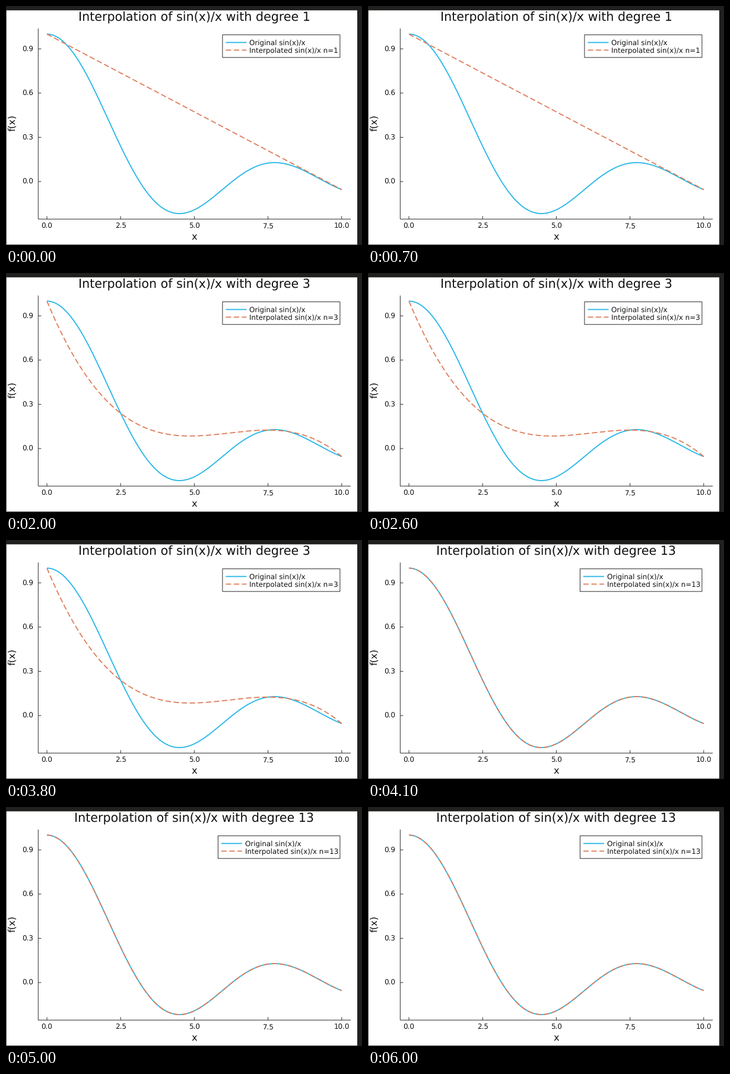
Recreate the animation shown at these times as a matplotlib script. Size 600 by 403 pixels, loop 6100 ms.

```python
import numpy as np
import matplotlib.pyplot as plt
from matplotlib.animation import FuncAnimation
from matplotlib.patches import Rectangle

W, H, DPI = 600, 403, 64
PT = 72 / DPI  # points per pixel
FRAMES, STEP = 61, 100
STAGE_FRAMES = 20
DEGREES = (1, 3, 13)

BLUE, ORANGE, INK, DARK = "#24b6e8", "#de7c59", "#2c2c2c", "#20201e"
TITLE, GUIDE, SMALL = 20.6, 16.2, 11.85
LEFT, RIGHT, TOP, BOTTOM = 54.3, 581, 38, 359.3
CURVE = 1.8

plt.rcParams.update({"font.family": "DejaVu Sans", "text.hinting": "none",
                     "text.hinting_factor": 8, "toolbar": "None"})

fig = plt.figure(figsize=(W / DPI, H / DPI), dpi=DPI, facecolor=DARK)
ax = fig.add_axes([0, 0, 1, 1])
ax.set(xlim=(0, W), ylim=(H, 0))
ax.axis("off")


def px(x):
    return 69 + 49.68 * np.asarray(x)


def py(y):
    return 296 - 248.6 * np.asarray(y)


def f(x):
    return np.sinc(np.asarray(x) / np.pi)


def interpolate(n, x):
    """Lagrange polynomial through the Chebyshev extrema on [0, 10]."""
    nodes = 5 - 5 * np.cos(np.pi * np.arange(n + 1) / n)
    total = np.zeros_like(x)
    for k, node in enumerate(nodes):
        others = np.delete(nodes, k)
        basis = np.prod((x[:, None] - others) / (node - others), axis=1)
        total += f(node) * basis
    return total


def rect(x0, y0, x1, y1, **style):
    return ax.add_patch(Rectangle((x0, y0), x1 - x0, y1 - y0,
                                  snap=False, **style))


def line(xs, ys, color=INK, width=1.0, dashed=False):
    style = (0, (9.1 / width, 4.5 / width)) if dashed else "-"
    return ax.plot(xs, ys, color=color, lw=width * PT, ls=style, snap=False,
                   dash_capstyle="butt", solid_capstyle="butt")[0]


def label(x, y, text, size, ha="center", **kw):
    return ax.text(x, y, text, size=size * PT, ha=ha, va="baseline",
                   color="#111111", **kw)


# Window edge and white page
rect(0, 7.4, 592, H, fc="#5a5a58", lw=0)
rect(1, 7.4, 592, 402, fc="white", lw=0)

# Axes, ticks and labels
line([LEFT, LEFT], [TOP, BOTTOM])
line([LEFT, RIGHT], [BOTTOM, BOTTOM])
for v in (0, 2.5, 5, 7.5, 10):
    line([px(v)] * 2, [BOTTOM, BOTTOM - 5])
    label(px(v), 374.8, f"{v:.1f}", SMALL)
for v in (0, 0.3, 0.6, 0.9):
    line([LEFT, LEFT + 5], [py(v)] * 2)
    label(46.3, py(v) + 4.3, f"{v:.1f}", SMALL, ha="right")
label(317.3, 394.5, "x", GUIDE)
label(15.6, 197.2, "f(x)", GUIDE, rotation=90, rotation_mode="anchor")
title = label(317.3, 25.6, "", TITLE)

# Curves
grid = np.linspace(0, 10, 400)
line(px(grid), py(f(grid)), BLUE, CURVE)
fit = line([], [], ORANGE, CURVE, dashed=True)

# Legend
ROWS = (61.5, 74.4)
BOX_RIGHT = 562.9
box = rect(364.9, 48.6, BOX_RIGHT, 86.8, fc="white", ec=INK, lw=PT, zorder=3)
keys = [line([], [], BLUE, CURVE), line([], [], ORANGE, CURVE, dashed=True)]
names = [label(0, y + 4.2, "Original sin(x)/x", SMALL, ha="left", zorder=5)
         for y in ROWS]
for key in keys:
    key.set_zorder(4)


def update(i):
    n = DEGREES[min(i // STAGE_FRAMES, len(DEGREES) - 1)]
    title.set_text(f"Interpolation of sin(x)/x with degree {n}")
    fit.set_data(px(grid), py(interpolate(n, grid)))

    left = 364.9 if n < 10 else 357.4
    box.set_x(left)
    box.set_width(BOX_RIGHT - left)
    for key, name, y in zip(keys, names, ROWS):
        key.set_data([left + 5.5, left + 40.5], [y, y])
        name.set_x(left + 45.6)
    names[1].set_text(f"Interpolated sin(x)/x n={n}")
    return title, fit, box, *keys, *names


anim = FuncAnimation(fig, update, frames=FRAMES, interval=STEP,
                     repeat=True, repeat_delay=0)
plt.show()
```
